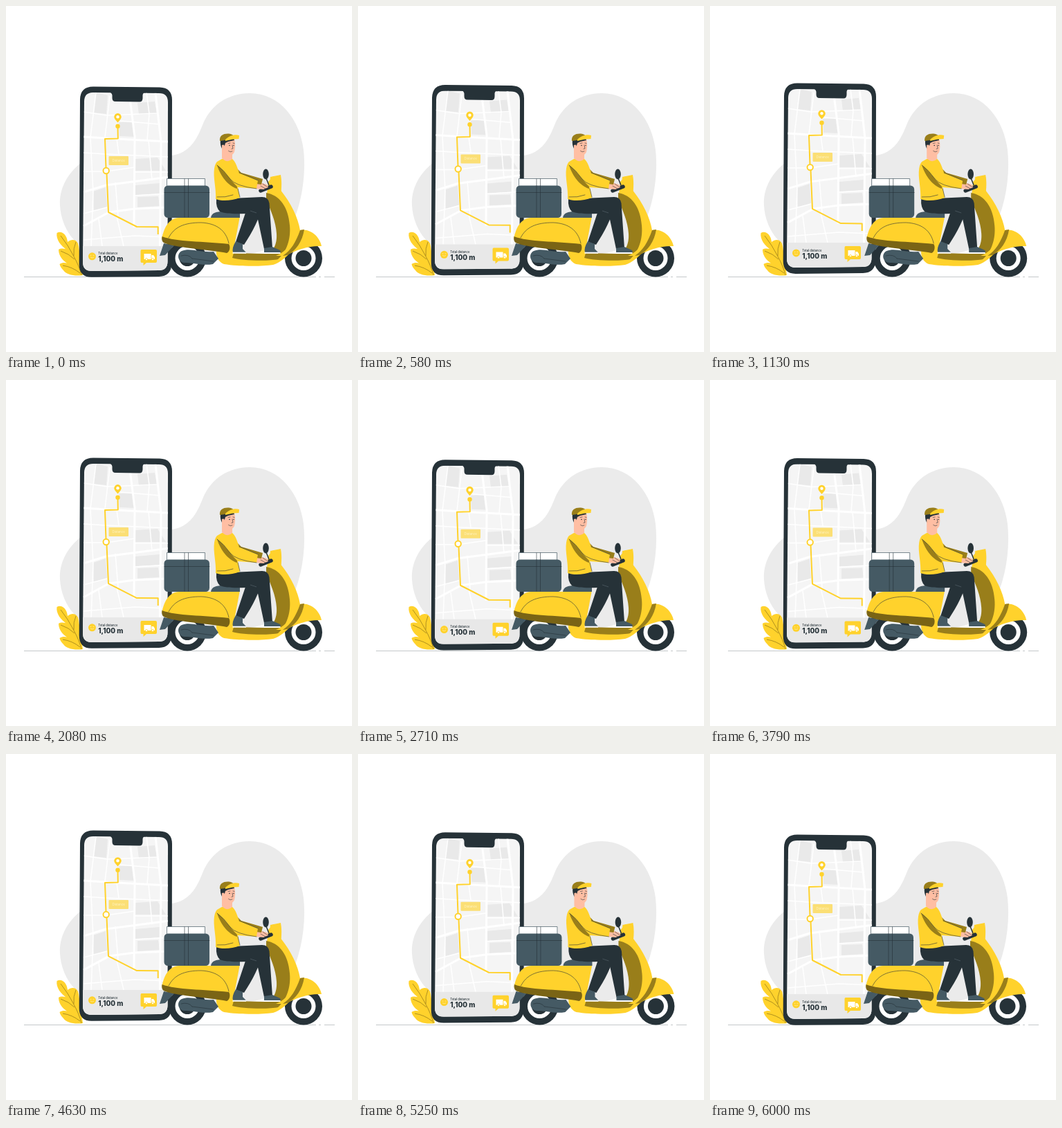
An HTML page that plays this animation: 500 by 500 pixels, repeating every 6040 ms.

```html
<!DOCTYPE html>
<html lang="en">
<head>
<meta charset="utf-8">
<title>Delivery tracking</title>
<style>
html, body { margin: 0; width: 100%; height: 100%; overflow: hidden; background: #fff; }
svg { display: block; width: 100%; height: 100%; }
text { font-family: Inter, "Open Sans", sans-serif; }
.yellow { fill: #ffd22c; }
.olive { fill: #997e1a; }
.shade { fill: #7a6415; }
.dark { fill: #263238; }
.slate { fill: #455a64; }
.skin { fill: #ffbea3; }
.white { fill: #fff; }
.line { fill: none; stroke: #263238; stroke-width: .6; stroke-linecap: round; stroke-linejoin: round; }
.route { fill: none; stroke: #ffd22c; stroke-width: 2; stroke-linejoin: round; }
.roads { fill: none; stroke: #fff; }
</style>
</head>
<body>
<svg viewBox="0 0 500 500">
  <defs>
    <clipPath id="screen"><path d="M126 125L221 126Q234 126 234 139L233.500 369Q233.500 382 221 382L124 383Q111 383 111 370L113 138Q113 125 126 125Z"/></clipPath>
    <g id="wheel">
      <circle class="dark" r="27"/>
      <circle class="white" r="17.500"/>
      <circle class="dark" r="11.500"/>
    </g>
  </defs>

  <path fill="#ebebeb" d="M240 216C266 212 276 192 284 172C296 142 322 126 352 126C397 126 425 166 430 208C434 246 427 292 408 326C390 356 350 362 306 360H130C101 348 80 323 78 288C77 264 88 243 108 227C150 220 200 224 240 216Z"/>
  <path d="M26 391.500H448M452 391.500H455M460 391.500H475" stroke="#b5babd" stroke-width=".8"/>

  <g id="leaf">
    <path class="yellow" d="M73.500 328C80 324 88 330 89 341C96 335 104 338 105 347L111 389C99 391 87 388 83 382C80 379 78 376 77.500 373C82 370 88 371 92 373C84 371 76 362 76 352C79 350 86 350 89 353C79 347 72 337 73.500 328Z"/>
    <path d="M79 332Q90 346 97 360Q106 376 109 389M79 354Q91 358 99 366M82 375Q96 377 107 386M101 341Q97 350 98 361" fill="none" stroke="#7a6415" stroke-width=".6"/>
  </g>

  <g id="phone">
    <path class="dark" d="M126 116.500L222 117.500Q240 118 240 136L239.500 372Q239 390.500 221 391L124 391.800Q105.500 392 105.700 373L107 135Q107.500 116.500 126 116.500Z"/>
    <g clip-path="url(#screen)">
      <path fill="#f5f5f5" d="M110 124H235V384H110Z"/>
      <path fill="#e9e9e9" d="M130 125L147 129L145 156L126 154ZM190 140L215 138L218 156L192 157ZM187 221L219 219L231 238L187 238ZM126 268L144 262L146 290L127 297ZM187 259L222 256L223 271L187 273ZM190 276L220 275L222 289L190 291ZM163 168L184 167L187 189L164 188Z"/>
      <g class="roads" stroke-width="3">
        <path d="M112 189L160 192L236 196M112 269L144 259L236 247M178 125L186 189L185 320M216 125L224 196L222 383M112 318L149 298L186 293L236 291"/>
      </g>
      <g class="roads" stroke-width="1.500">
        <path d="M130 125L122 190L126 270L123 347M150 130L143 190M112 153L146 158L220 155M112 212L144 214L234 218M187 240H236M112 239H145L186 233M158 255L162 304M146 291L112 300M187 274L236 271M160 304L170 347M134 308L139 347M203 125L207 156L204 194M206 194L211 252M165 166L223 171M112 338L186 332L236 334M160 192L163 214"/>
      </g>
      <path class="route" d="M161.500 174L161.800 191.500L143 192L144.500 234M145.500 242L148 298L189 319L219.700 319.300V330"/>
      <circle cx="144.700" cy="238" r="4.200" fill="#fff" stroke="#ffd22c" stroke-width="2"/>
      <circle class="yellow" cx="161.500" cy="173.700" r="3.200"/>
      <path class="yellow" d="M161.500 168.500C158 164.500 156.300 162.500 156.300 160.300A5.200 5.200 0 0 1 166.700 160.300C166.700 162.500 165 164.500 161.500 168.500Z"/>
      <circle class="white" cx="161.500" cy="160.200" r="2.200"/>
      <rect x="148.500" y="217" width="28.500" height="13" rx="1" fill="#fbdf75"/>
      <text x="162.700" y="225" font-size="4.500" fill="#fff3c4" text-anchor="middle">Distance</text>
      <path fill="#e8e8e8" d="M110 347H235V384H110Z"/>
      <circle class="yellow" cx="124.500" cy="361.800" r="5.500"/>
      <path d="M121.500 360.300H123.500M125.500 360.300H127.500M122 363Q124.500 365 127 363" fill="none" stroke="#fff0b5" stroke-width=".7"/>
      <text class="dark" x="133.300" y="359.500" font-size="4.200" font-weight="500">Total distance</text>
      <text class="dark" x="133.300" y="369.500" font-size="9.800" font-weight="800">1,100 m</text>
      <path class="yellow" d="M196 352H216Q218 352 218 354V369Q218 371 216 371H203L198.500 375V371H196Q194.500 371 194.500 369V354Q194.500 352 196 352Z"/>
      <path class="white" d="M199.500 358H209.500V366H199.500ZM210.300 360H213L215 363V366H210.300Z"/>
      <g class="white" stroke="#ffd22c" stroke-width=".7"><circle cx="203" cy="366" r="1.600"/><circle cx="212" cy="366" r="1.600"/></g>
    </g>
    <path class="dark" d="M148 124H202Q197.500 125.500 197.500 129V133Q197.500 138.500 193 138.500L158 138Q153.500 138 153.500 133V129Q153 125 148 124Z"/>
  </g>

  <g id="scooter">
    <use href="#wheel" x="262" y="364.500"/>
    <use href="#wheel" x="430" y="364.500"/>

    <!-- body -->
    <path class="slate" d="M228 343L243 346L230 360L222 361Z"/>
    <path class="yellow" d="M300 304H338L331 341L329 357L374 361C393 360 401 345 402 328C402 307 388 291 377 272L379 254L386 246L397 247L397.500 267C412 285 422 306 425 324C426 343 405 368 386 374C367 377 333 376 315 373C307 370 303 362 304 352Z"/>
    <path class="olive" d="M376 270C395 273 408 290 410 317C412 337 405 356 393 366C381 369 338 368 327 364L329 357L373 358C386 357 392 345 391 329C390 311 382 294 376 280Z"/>
    <path class="yellow" d="M390 361C405 355 414 342 425 324C441 321 454 335 456 347C439 346 419 352 404 361Z"/>
    <path class="olive" d="M400 361C412 353 419 341 425 324L431 323C428 341 419 353 407 360Z"/>
    <path class="yellow" d="M225 336C229 318 236 307 250 306H335C337 315 329 338 322 350Z"/>
    <path class="shade" d="M225.500 333C246 341 286 340 322 344C325 348 323 356 319 357C294 352 250 350 230 343Q224 341 225.500 333Z"/>
    <path class="line" d="M235 335C243 319 258 313 282 313C304 314 318 324 322 343" stroke-width=".4"/>
    <path class="slate" d="M296 306C297 299 303 297 314 297H338V306Z"/>
    <path class="slate" d="M254 354C267 349 281 357 300 355L307 365L299 373C283 376 271 370 258 371C248 370 246 358 254 354Z"/>
    <path class="line" d="M253 361Q264 358 269 365M269 365L300 369"/>

    <!-- cargo box -->
    <path d="M232.500 261V249.500H287.500V261" fill="#fff" stroke="#455a64" stroke-width=".7"/>
    <path class="line" d="M258 250V260M263.500 250V260"/>
    <rect class="slate" x="228.500" y="259.500" width="65.500" height="46.500" rx="5.500"/>
    <path class="line" d="M229 269.500H294M258 260V305M263.500 260V305"/>

    <!-- legs -->
    <path class="dark" d="M327 283L371 286C367 306 356 327 344 345L332 341L346 299Z"/>
    <path class="slate" d="M332 340L342 344L342 351L347 356L328 356Q326 350 332 340Z"/>
    <path class="white" d="M327.500 355.700H347V357.700H327.500Z"/>
    <path class="dark" d="M304 279L370 276Q379 276 380.500 285L385 350L373 351L362 299C338 301 318 301 309 297Q303 291 304 279Z"/>
    <path d="M362 299L353 296" stroke="#65737a" stroke-width=".5"/>
    <path class="slate" d="M373 350L385 348L395 352.500Q398 354 396 356.500H373Z"/>
    <path class="white" d="M372.500 356H396.500V358H372.500Z"/>

    <!-- handlebar -->
    <path class="yellow" d="M382 247L397 244Q399 255 397.500 268L380 271Z"/>
    <path d="M376 249L380 259" stroke="#263238" stroke-width="1.500"/>
    <ellipse class="dark" cx="375.500" cy="243" rx="4.300" ry="7.500"/>
    <path d="M368 267L383 261" stroke="#263238" stroke-width="5.500" stroke-linecap="round"/>

    <!-- rider -->
    <path class="skin" d="M360 254L370 256L377 258L379 262L372 265L361 264Z"/>
    <path class="line" d="M371 257L377 261M368 260L375 264" stroke-width=".4"/>
    <path class="olive" d="M333 234L340 241L371 250L369 258L338 254Z"/>
    <path class="yellow" d="M305 225L312 221L327 221C332 225 334 233 337 241L364 252L362 264L335 262L338 277C326 282 310 282 303 279C304 263 299 248 301 235Q302 228 305 225Z"/>
    <path class="olive" d="M305 230C314 236 322 249 334 261L334 264C321 260 310 246 305 230Z"/>
    <path class="line" d="M305 230Q315 237 324 250Q331 260 362 264M337 241L364 252M335 264L338 276M305 276Q317 277 328 273" stroke-width=".5"/>
    <path class="skin" d="M312 203L327 209L327 221Q320 228 312 220Z"/>
    <path class="skin" d="M313 194H330.500Q332 203 330 211Q327 217 321 215Q313 212 312 203Z"/>
    <path class="dark" d="M310 194L329 191L330 194L321 196L317 198L315 205L312 206Q309 200 310 194Z"/>
    <path class="skin" d="M312 201Q316 199 316 204Q316 208 312 207Z"/>
    <path class="line" d="M321 198.500L324 198M328 198L330 198.500M327 201L328 206L326 206.500M321.500 209.500Q324 212 327 210"/>
    <circle class="dark" cx="323" cy="201.500" r=".8"/>
    <circle class="dark" cx="329" cy="201.500" r=".7"/>
    <path class="olive" d="M309 195C308 187 314 184 322 184.500Q328 185 330 189L324 193Z"/>
    <path class="yellow" d="M317 193C322 188 330 185 337 187L336.500 192Q327 192 317 195Z"/>
  </g>
</svg>
<script>
const LOOP = 6040, SPAN = 6000, FLOAT = 3000, SHAKE = 300;
const phone = document.getElementById('phone');
const scooter = document.getElementById('scooter');

// [phase, x offset] for one shake of the engine
const shakeSteps = [[0, 0], [.45, 0], [.6, 1.2], [.8, 1.2], [.92, 0], [1, 0]];

function lerpSteps(steps, p) {
  const i = steps.findIndex(([at]) => at > p);
  const [p0, v0] = steps[i - 1], [p1, v1] = steps[i];
  return v0 + (v1 - v0) * (p - p0) / (p1 - p0);
}

function draw(time) {
  const t = Math.min(time % LOOP, SPAN);
  const p = t % FLOAT / FLOAT;
  const lift = 6.5 * (1 - Math.abs(1 - 2 * p));
  phone.setAttribute('transform', `translate(0 ${-lift})`);
  scooter.setAttribute('transform', `translate(${lerpSteps(shakeSteps, t % SHAKE / SHAKE)} 0)`);
}

const start = performance.now();
function tick() {
  draw(performance.now() - start);
  requestAnimationFrame(tick);
}
tick();
</script>
</body>
</html>
```
